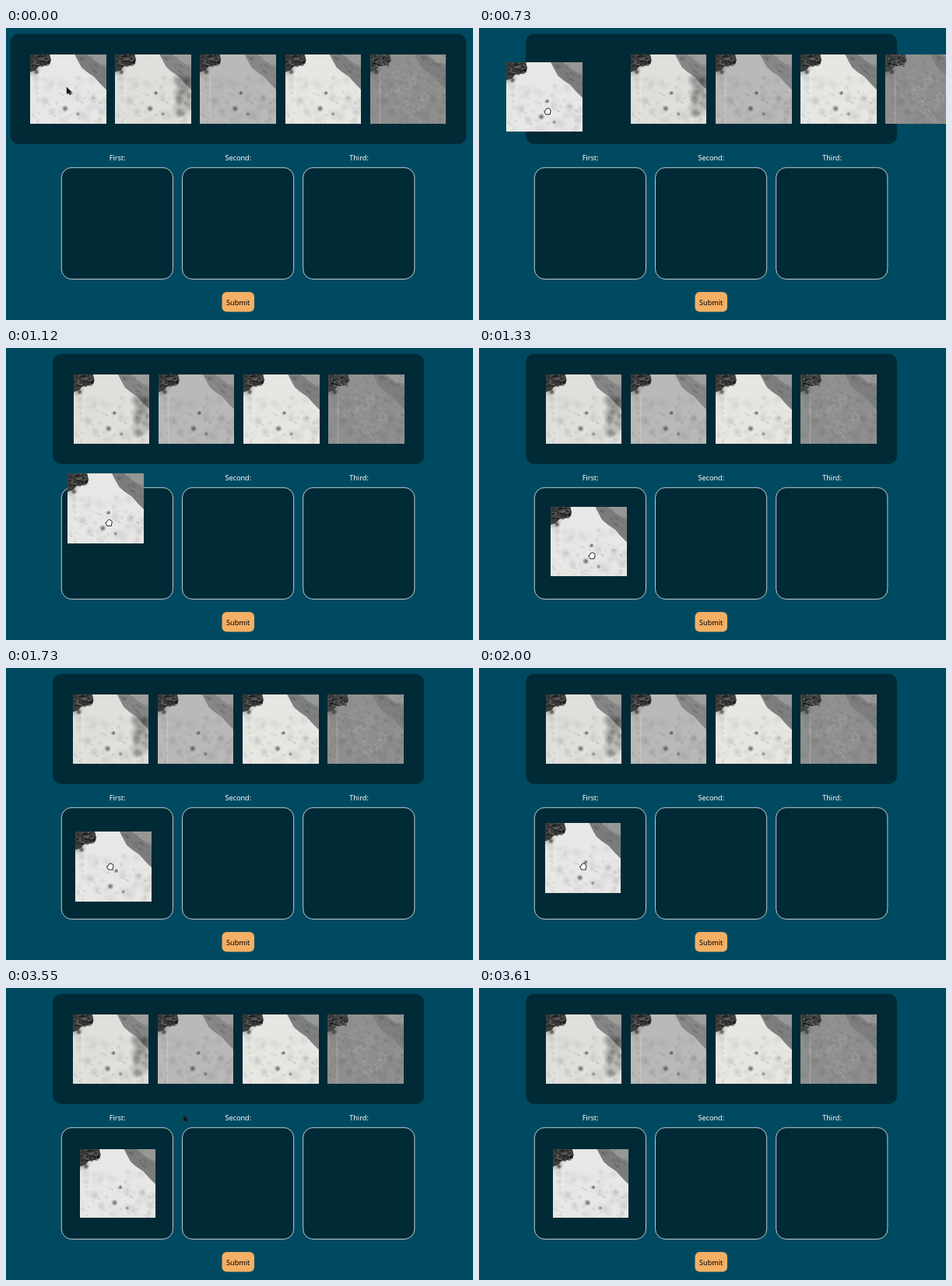
An HTML page with a canvas that plays this animation: 600x375 px, repeating every 5670 ms.

```html
<!DOCTYPE html>
<html lang="en">
<head>
<meta charset="utf-8">
<style>
html, body { margin: 0; width: 100%; height: 100%; overflow: hidden; background: #004a61; }
canvas { display: block; }
</style>
</head>
<body>
<canvas id="stage" width="600" height="375"></canvas>
<script>
const ctx = document.getElementById('stage').getContext('2d');
const LOOP = 5670, TICK = 1000 / 15;
const LIFT = 670, RELEASE = 1670, LAND = 2270, LEAVE = 3550;
const W = 97.5, H = 89.5, PITCH = 109.2;

// time, card x, card y
const dragPath = [
  [LIFT, 31, 35], [730, 35, 43.5], [1000, 64.5, 118], [1120, 78.5, 159],
  [1390, 96, 216], [RELEASE, 96, 216], [1730, 89.2, 210.5], [LAND, 80, 188]
];

const looks = [
  { ground: '#e7e7e5', band: '#7b7d7c' },
  { ground: '#dfdfdc', band: '#858786', smoke: true },
  { ground: '#b9b9b7', band: '#868786' },
  { ground: '#e6e6e3', band: '#7e807f' },
  { ground: '#8f908e', band: '#7d7e7d', fields: true }
];

function makeAerial({ ground, band, smoke, fields }) {
  const c = document.createElement('canvas');
  c.width = W * 2;
  c.height = H * 2;
  const g = c.getContext('2d');
  g.scale(2, 2);

  let seed = 4271;
  const rnd = (a = 0, b = 1) => a + (b - a) * (seed = seed * 16807 % 2147483647) / 2147483647;
  const shape = (d, color) => {
    g.fillStyle = color;
    g.fill(new Path2D(d));
  };
  const soft = (x, y, r, alpha, shade = 35) => {
    const s = g.createRadialGradient(x, y, 0, x, y, r);
    s.addColorStop(0, `rgba(${shade},${shade},${shade},${alpha})`);
    s.addColorStop(1, `rgba(${shade},${shade},${shade},0)`);
    g.fillStyle = s;
    g.fillRect(x - r, y - r, r * 2, r * 2);
  };
  const mark = (x, y, length, alpha, shade) => {
    g.fillStyle = `rgba(${shade},${shade},${shade},${alpha})`;
    g.beginPath();
    g.ellipse(x, y, length, length * 0.4, rnd(0.4, 0.9), 0, 7);
    g.fill();
  };

  g.fillStyle = ground;
  g.fillRect(0, 0, W, H);

  // faint ground marks
  for (let i = 0; i < 60; i++) soft(rnd(0, W), rnd(30, H), rnd(2, 8), rnd(0, 0.12));
  for (let i = 0; i < (fields ? 350 : 60); i++)
    mark(rnd(0, W), rnd(fields ? 0 : 45, H), rnd(0.5, 3), rnd(0, 0.16),
      fields && i % 2 ? 215 : 60);
  if (fields) {
    for (let i = 0; i < 30; i++) {
      g.strokeStyle = `rgba(200,200,196,${rnd(0.1, 0.35)})`;
      g.beginPath();
      g.arc(rnd(20, 86), rnd(24, 78), rnd(2, 7), rnd(0, 6), rnd(3, 9));
      g.stroke();
    }
  }

  // slope in the upper right corner
  shape('M57 0 L61 8 66 17 73 23 82 29 90 38 98 46 V0 Z', band);
  shape('M72 0 L84 9 98 18 V0 Z', 'rgba(200,200,197,.35)');
  for (let i = 0; i < 35; i++) {
    const x = rnd(62, W);
    mark(x, rnd(0, x - 58), rnd(1, 4), rnd(0, 0.18), 45);
  }

  // town in the upper left corner
  soft(3, 18, 12, 0.4);
  shape('M0 0 H25 L27 8 24 14 11 16 7 21 0 23 Z', fields ? '#444644' : '#3d3e3d');
  for (let i = 0; i < 100; i++) {
    const y = rnd(0, 15);
    g.fillStyle = i % 3 ? `rgba(10,12,11,${rnd(0, 0.7)})` : `rgba(190,190,186,${rnd(0, 0.4)})`;
    g.fillRect(rnd(0, 23), y, rnd(1, 4), rnd(0.6, 2));
  }
  soft(8, 23, 4, 0.8);
  g.fillStyle = 'rgba(245,245,240,.25)';
  g.fillRect(12, 27, 1, H);

  if (smoke) for (let i = 0; i < 35; i++) soft(rnd(80, 99), rnd(32, 78), rnd(3, 11), 0.16);
  if (!fields) {
    soft(52.5, 50, 3, 0.8);
    soft(45, 70, 4.5, 0.7);
    soft(61.5, 77, 3, 0.55);
  }
  return c;
}

const cards = looks.map(makeAerial);

function box(x, y, w, h, r, fill, line) {
  ctx.beginPath();
  ctx.roundRect(x, y, w, h, r);
  ctx.fillStyle = fill;
  ctx.fill();
  if (line) {
    ctx.strokeStyle = line;
    ctx.lineWidth = 0.9;
    ctx.stroke();
  }
}

function label(text, x, y, color) {
  ctx.fillStyle = color;
  ctx.fillText(text, x, y);
}

function cursor(d, x, y, fill, line) {
  const path = new Path2D(d);
  ctx.save();
  ctx.translate(x, y);
  ctx.lineWidth = 1;
  ctx.fillStyle = fill;
  ctx.strokeStyle = line;
  ctx.fill(path);
  ctx.stroke(path);
  ctx.restore();
}

const arrow = (x, y) => cursor('M0 0 V9 L2 7 4 10 5 9 4 6.5 6 6 Z', x, y, '#111', 'rgba(60,60,60,.5)');
const hand = (x, y) => cursor('M-2.5 4 L-4.5 0 -2.5 -1 -2 -3 0 -4 3 -3 4 -1 3 4 Z', x, y, '#fff', '#222');

// cubic-bezier(.2, 0, 0, 1)
function settle(p) {
  if (p <= 0) return 0;
  if (p >= 1) return 1;
  let lo = 0, hi = 1;
  for (let i = 0; i < 20; i++) {
    const s = (lo + hi) / 2;
    if (0.6 * (1 - s) ** 2 * s + s ** 3 < p) lo = s; else hi = s;
  }
  return 3 * (1 - lo) * lo ** 2 + lo ** 3;
}

function along(path, t) {
  const i = Math.max(1, path.findIndex(p => p[0] >= t));
  const a = path[i - 1], b = path[i], k = (t - a[0]) / (b[0] - a[0]);
  return a.map((v, n) => v + (b[n] - v) * k);
}

function draw(t) {
  const lifted = t >= LIFT;
  const now = 665 + Math.floor((t - 653) / TICK) * TICK;

  ctx.fillStyle = '#004a61';
  ctx.fillRect(0, 0, 600, 375);
  box(lifted ? 60 : 5.5, 7.5, lifted ? 477 : 586, 141.5, 11, '#002a36');

  ctx.font = '500 9.1px "Noto Sans", "Open Sans", sans-serif';
  ctx.textAlign = 'center';
  ['First:', 'Second:', 'Third:'].forEach((name, i) => {
    const x = 71.3 + i * 155.2;
    label(name, x + 71.8, 169.6, '#fff');
    box(x, 179.3, 143.2, 143.2, 13, '#002a36', '#d5dde0');
  });
  box(277.5, 339, 41.5, 25.5, 6, '#f4af65');
  label('Submit', 298.2, 355.5, '#000');

  const shift = lifted ? 54.6 - PITCH * settle((now - 965) / 200) : 0;
  for (let i = 1; i < cards.length; i++)
    ctx.drawImage(cards[i], 31 + PITCH * i + shift, 33.5, W, H);

  if (!lifted) {
    ctx.drawImage(cards[0], 31, 33.5, W, H);
    arrow(78, 76);
  } else if (t < LAND) {
    const [, x, y] = along(dragPath, Math.max(LIFT, now));
    ctx.drawImage(cards[0], x, y, W, H);
    if (t < RELEASE) hand(x + 53, y + 63);
    else hand(134, 255);
  } else {
    ctx.drawImage(cards[0], 95, 206.5, 96.5, 88.5);
    if (t < LEAVE) arrow(132.8, 252.5);
    else if (t < LEAVE + 60) arrow(228, 163);
  }
}

function frame() {
  draw(performance.now() % LOOP);
  requestAnimationFrame(frame);
}
frame();
</script>
</body>
</html>
```
